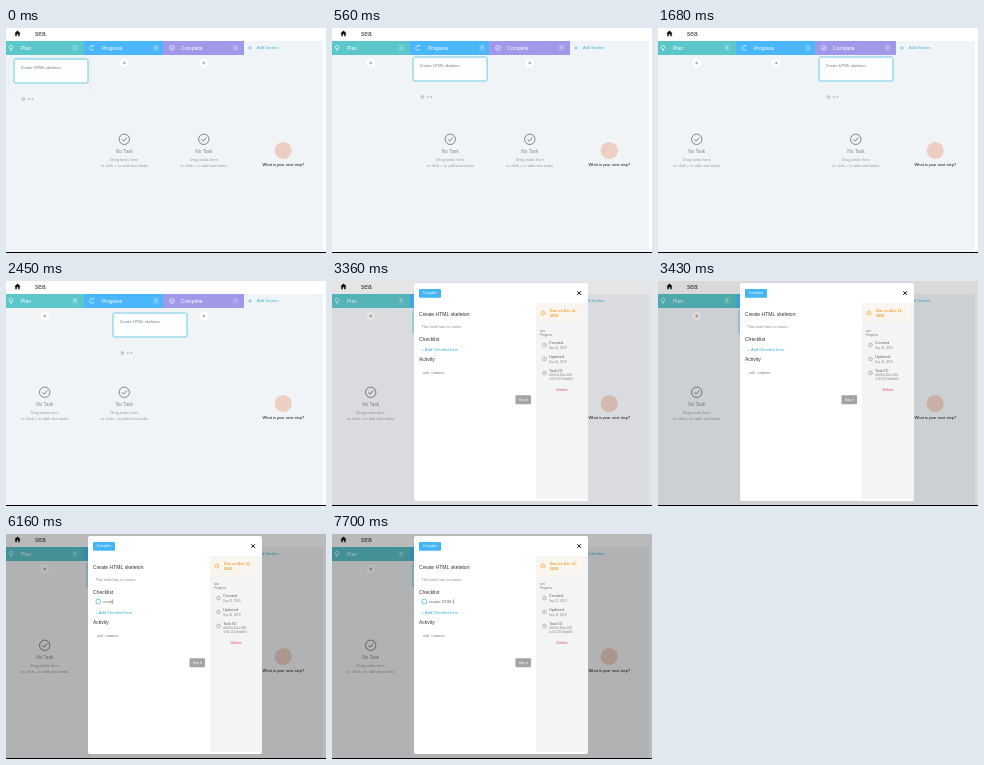
An HTML page with a canvas for the animation above (8000 ms loop, 320x225 px).

```html
<!DOCTYPE html>
<html lang="en">
<head>
<meta charset="utf-8">
<title>Task board</title>
<style>
html, body { margin: 0; width: 100%; height: 100%; overflow: hidden; background: #fff; }
canvas { display: block; width: 320px; height: 225px; }
</style>
</head>
<body>
<canvas id="stage"></canvas>
<script>
const W = 320, H = 225, LOOP = 8000, STEP = 70;
const SANS = '"Liberation Sans", Arial, sans-serif';
const MONO = '"Liberation Mono", monospace';
const canvas = document.getElementById('stage');
const ctx = canvas.getContext('2d');
const ratio = window.devicePixelRatio || 1;
canvas.width = W * ratio;
canvas.height = H * ratio;
ctx.scale(ratio, ratio);

const columns = [
  { x: 0, w: 78, name: 'Plan', color: '#5cc7cb', textX: 15, iconX: 5, countX: 69, mid: 38.7 },
  { x: 78, w: 79, name: 'Progress', color: '#4ab7fc', textX: 96, iconX: 86, countX: 150, mid: 118.3 },
  { x: 157, w: 81, name: 'Complete', color: '#a098e8', textX: 175, iconX: 166, countX: 229.5, mid: 197.8 }
];

// time, left, top of the dragged card
const drag = [
  [0, 8, 31], [140, 16, 34], [280, 16, 34], [560, 81, 29],
  [1050, 81, 29], [1330, 138, 30], [1400, 138, 30], [1680, 161, 29],
  [2030, 161, 29], [2450, 107, 32], [2660, 81, 29]
];

// time, text in the checklist field
const typing = [
  [4480, ''], [5530, 'c'], [5810, 'cr'], [5880, 'cre'], [5950, 'crea'],
  [6160, 'creat'], [6230, 'create'], [6440, 'create '], [6580, 'create d'],
  [7000, 'create '], [7210, 'create D'], [7350, 'create DO'],
  [7490, 'create DOM'], [7700, 'create DOM ']
];

function text(s, x, y, size, color, opt = {}) {
  ctx.font = `${opt.weight || 400} ${size}px ${opt.font || SANS}`;
  ctx.textAlign = opt.align || 'left';
  ctx.fillStyle = color;
  ctx.fillText(s, x, y + size * 0.35);
}

function box(x, y, w, h, color) {
  ctx.fillStyle = color;
  ctx.fillRect(x, y, w, h);
}

function rounded(x, y, w, h, r, fill, stroke, width = 1) {
  ctx.beginPath();
  ctx.roundRect(x, y, w, h, r);
  paint(fill, stroke, width);
}

function circle(x, y, r, fill, stroke, width = 1) {
  ctx.beginPath();
  ctx.arc(x, y, r, 0, Math.PI * 2);
  paint(fill, stroke, width);
}

function paint(fill, stroke, width) {
  if (fill) { ctx.fillStyle = fill; ctx.fill(); }
  if (stroke) { ctx.strokeStyle = stroke; ctx.lineWidth = width; ctx.stroke(); }
}

function line(points, color, width) {
  ctx.beginPath();
  points.forEach(([x, y]) => ctx.lineTo(x, y));
  paint(null, color, width);
}

function plus(x, y, r, color, width) {
  line([[x - r, y], [x + r, y]], color, width);
  line([[x, y - r], [x, y + r]], color, width);
}

function tick(x, y, r, color, width) {
  circle(x, y, r, null, color, width);
  line([[x - r * 0.45, y], [x - r * 0.1, y + r * 0.36], [x + r * 0.5, y - r * 0.36]], color, width);
}

function place(t) {
  const i = drag.findIndex(k => k[0] > t);
  if (i < 0) return drag[drag.length - 1].slice(1);
  const a = drag[i - 1], b = drag[i];
  const p = (t - a[0]) / (b[0] - a[0]);
  return [a[1] + (b[1] - a[1]) * p, a[2] + (b[2] - a[2]) * p];
}

function homeColumn(t) {
  if (t < 770) return 0;
  if (t < 1820) return 1;
  return t < 2800 ? 2 : 1;
}

function headerIcon(i, x, y) {
  const c = '#fff';
  if (i === 0) {
    circle(x, y - 0.8, 1.8, null, c, 0.6);
    line([[x - 0.9, y + 1.6], [x + 0.9, y + 1.6]], c, 0.6);
    line([[x - 0.6, y + 2.6], [x + 0.6, y + 2.6]], c, 0.6);
  } else if (i === 1) {
    ctx.beginPath();
    ctx.arc(x, y, 2.3, 0.5, 5.2);
    paint(null, c, 0.6);
    line([[x + 0.2, y - 2.3], [x + 1.7, y - 1.9], [x + 1.6, y - 3.2]], c, 0.5);
  } else {
    tick(x, y, 2.4, c, 0.6);
  }
}

function topBar() {
  box(0, 0, W, 13, '#fff');
  ctx.beginPath();
  [[8.4, 5.6], [11.5, 2.6], [14.6, 5.6], [13.7, 5.6], [13.7, 8.2], [12.2, 8.2],
   [12.2, 6.2], [10.8, 6.2], [10.8, 8.2], [9.3, 8.2], [9.3, 5.6]].forEach(([x, y]) => ctx.lineTo(x, y));
  paint('#111');
  text('sea', 29, 5.6, 6.6, '#333');
}

function column(c, i, home) {
  box(c.x, 13, c.w, 14, c.color);
  headerIcon(i, c.iconX, 20);
  text(c.name, c.textX, 20, 5.05, '#fff');
  const full = i === home;
  rounded(c.countX - 3, 16.5, 6, 7, 1, 'rgba(255,255,255,0.12)');
  text(full ? '1' : '0', c.countX, 20, 3.8, full ? 'rgba(255,255,255,0.6)' : '#fff', { align: 'center' });
  circle(c.mid, 35, 4.8, '#fff', '#e6e8ec', 0.4);
  plus(c.mid, 35, 1.5, '#777', 0.6);
  if (full) return;
  const mid = { align: 'center' };
  tick(c.mid, 111.3, 5.2, '#777', 0.9);
  text('No Task', c.mid, 123.3, 4.7, '#858585', mid);
  text('Drag tasks here', c.mid, 132, 4, '#999', mid);
  text('or click + to add new tasks', c.mid, 138, 4, '#999', mid);
}

function card(t) {
  const [x, y] = place(t);
  if (t < 70) rounded(2.5, 29.5, 82, 34, 2, null, 'rgba(215,232,240,0.7)', 0.5);
  rounded(x, y, 74, 24, 1.5, '#fdfefe', '#5cc5e4', 0.9);
  text('Create HTML skeleton', x + 6.7, y + 8.7, 4, '#777');
  const dy = y + 40;
  circle(x + 9.4, dy, 1.7, '#cdd0d3', '#b5b8bb', 0.4);
  circle(x + 14.8, dy, 0.9, '#b8bbbe');
  circle(x + 18.3, dy, 0.9, '#b8bbbe');
}

function board(t) {
  box(0, 0, W, H, '#fff');
  box(0, 13, 317, 211, '#f1f4f7');
  topBar();
  columns.forEach((c, i) => column(c, i, homeColumn(t)));
  plus(244, 20, 1.7, '#35b5d8', 0.6);
  text('Add Section', 251, 20, 4, '#35b5d8');
  circle(277.2, 122.5, 8.6, '#eccfc2');
  text('What is your next step?', 277.3, 137, 4, '#111', { align: 'center' });
  card(t);
}

function sideEntry(y, title, lines) {
  circle(212.5, y + 2, 1.9, null, '#999', 0.6);
  line([[212.5, y + 0.9], [212.5, y + 2], [213.4, y + 2.4]], '#999', 0.5);
  text(title, 217, y, 4, '#666');
  lines.forEach((s, i) => text(s, 217, y + 4.5 + i * 4, lines.length > 1 ? 2.6 : 3, '#888'));
}

function sidebar() {
  box(204, 22, 52, 196, '#f2f4f6');
  box(204.5, 23, 47, 18.5, '#faf5ee');
  circle(211, 32, 2, null, '#f4a83c', 0.7);
  line([[211, 30.8], [211, 32], [212, 32.5]], '#f4a83c', 0.5);
  text('Due on Dec 11,', 218, 30, 3.75, '#f0a030', { weight: 700 });
  text('2020', 218, 34.5, 3.75, '#f0a030', { weight: 700 });
  text('sea', 208, 49.7, 3, '#777');
  text('Progress', 208, 54, 3, '#777');
  sideEntry(62, 'Created', ['Sep 11, 2020']);
  sideEntry(76, 'Updated', ['Sep 11, 2020']);
  sideEntry(90, 'Task ID', ['a04c0d1-3b4a-4560', '-b7d2-5f17a6aab8fd']);
  text('Delete', 230, 109, 3.8, '#e0405c', { align: 'center' });
}

function checklistItem(t) {
  const value = typing.filter(k => k[0] <= t).pop()[1];
  if (value) rounded(90.1, 65.4, 4.4, 4.4, 1, '#fff', '#45b4e0', 0.7);
  else circle(92.3, 67.6, 2.3, '#fff', '#45b4e0', 0.7);
  text(value, 97, 67.5, 4.2, '#666');
  const end = 97 + ctx.measureText(value).width;
  if (t < 5040 || t >= 5530) box(end + 0.3, 65.4, 0.45, 4.4, '#333');
}

function modal(t) {
  ctx.save();
  ctx.beginPath();
  ctx.roundRect(82, 2, 174, 218, 2);
  ctx.fillStyle = '#fff';
  ctx.fill();
  ctx.clip();
  sidebar();
  rounded(87, 8, 22, 8.7, 1, '#45b6f5');
  text('Complete', 98, 12.3, 3.4, '#fff', { align: 'center' });
  line([[245.3, 10.2], [249, 13.9]], '#111', 1);
  line([[249, 10.2], [245.3, 13.9]], '#111', 1);
  text('Create HTML skeleton', 87, 33, 5.05, '#333');
  text('This task has no notes', 89.5, 45.2, 4, '#888');
  text('Checklist', 87, 58.5, 5, '#333');
  const open = t >= 4480;
  const dy = open ? 10 : 0;
  if (open) checklistItem(t);
  text('+ Add Checklist Item', 89.7, 68.7 + dy, 3.95, '#2faadb');
  text('Activity', 87, 78.6 + dy, 5, '#333');
  text('Add comment', 91, 92.3 + dy, 3.33, '#777', { font: MONO });
  rounded(183.5, 114.3 + dy, 15.5, 9, 1, '#a3a3a3');
  text('Say it', 191.3, 118.8 + dy, 3.6, '#fff', { align: 'center' });
  ctx.restore();
}

function draw(now) {
  const t = Math.floor((now % LOOP) / STEP) * STEP;
  board(t);
  if (t >= 3290) {
    const p = Math.min(1, (t - 3220) / 560);
    box(0, 0, W, H, `rgba(0,0,0,${0.27 * Math.sin(p * Math.PI / 2)})`);
    ctx.globalAlpha = t < 3360 ? 0.6 : 1;
    modal(t);
    ctx.globalAlpha = 1;
  }
  box(0, 224, W, 1, '#000');
}

const start = performance.now();
function tickFrame() {
  draw(performance.now() - start);
  requestAnimationFrame(tickFrame);
}
tickFrame();
</script>
</body>
</html>
```
